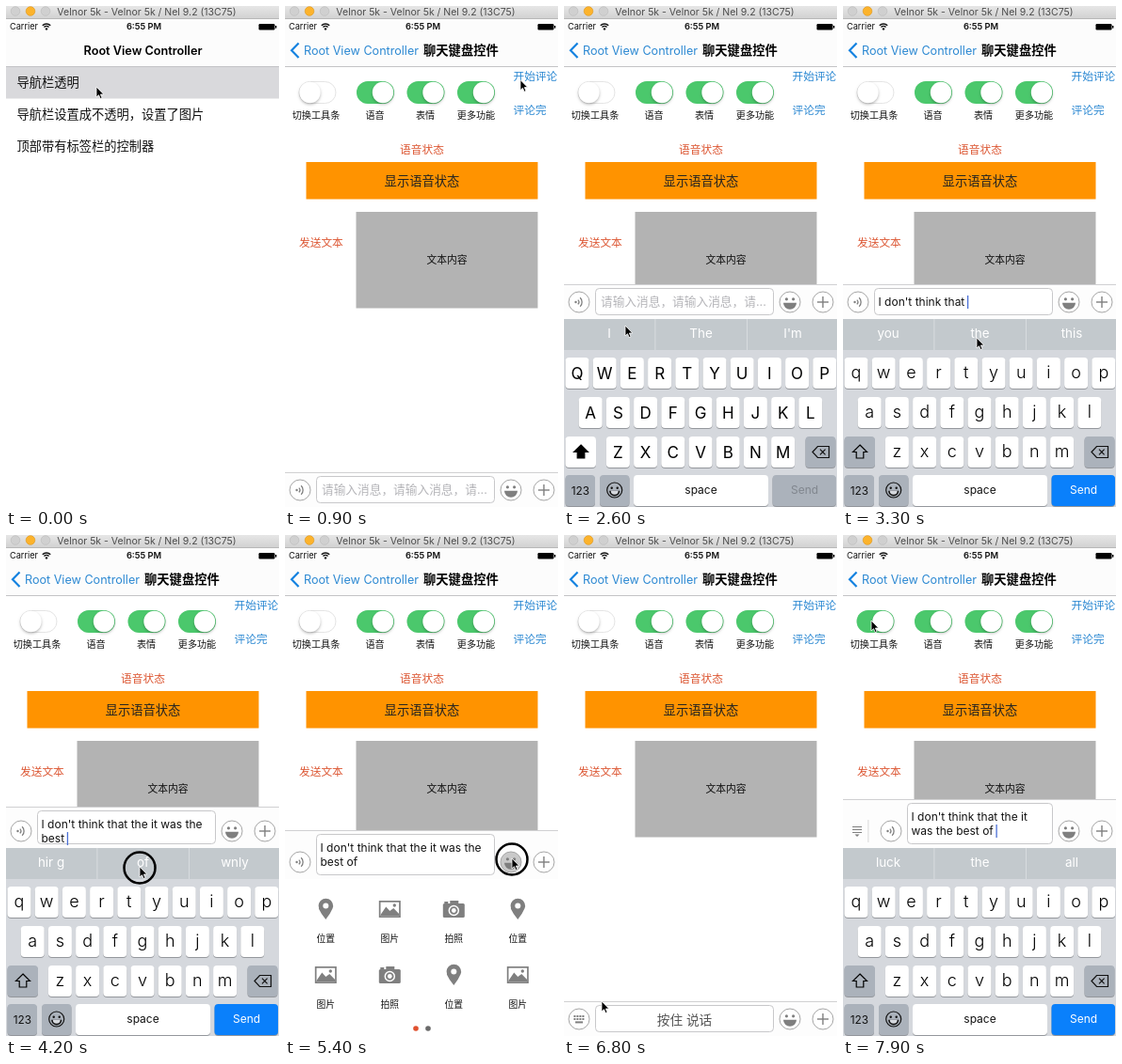
Animation of 290x533 px, one loop 8 s. Source, as an HTML page with a canvas:

```html
<!DOCTYPE html>
<html lang="zh-CN">
<head>
<meta charset="utf-8">
<title>Chat keyboard demo</title>
<style>
html, body { margin: 0; width: 100%; height: 100%; overflow: hidden; background: #fff; }
canvas { display: block; width: 290px; height: 533px; }
</style>
</head>
<body>
<canvas id="stage"></canvas>
<script>
const W = 290, H = 533, LOOP = 8000;
const FONT = 'Inter, "Noto Sans CJK SC", "Noto Sans CJK", sans-serif';
const BLUE = '#2b88d2', RED = '#dc5632', GREY = '#7f7f7f', RING = '#a6a6a6';
const canvas = document.getElementById('stage');
const ratio = window.devicePixelRatio || 1;
canvas.width = W * ratio;
canvas.height = H * ratio;
const c = canvas.getContext('2d');

// --- timing helpers ---
const smooth = x => { x = Math.min(1, Math.max(0, x)); return x * x * (3 - 2 * x); };
const ramp = (t, start, dur) => smooth((t - start) / dur);
const track = (t, steps) => steps.reduce((sum, [start, dur, by]) => sum + by * ramp(t, start, dur), 0);

const KEYS_UP = [[1080, 300, 200], [1577, 300, -200], [2230, 290, 200], [4780, 250, -200], [7060, 280, 200]];
const BAR_UP = [[1080, 300, 200], [1564, 300, -200], [2230, 290, 200], [4780, 250, -33], [6260, 280, -167], [7060, 280, 200]];
const PANEL_UP = [[4780, 250, 167], [6260, 280, -167]];
const BAR_GROW = [[4120, 170, 15], [6260, 140, -15], [7060, 190, 15]];

const WORDS = "I don't think that the it was the best of".split(' ');
const wordTime = i => 2720 + 175 * i;
const CLICKS = [1080, 1562, 2230, 4780, 5460, 6260, 7060, 7740, ...WORDS.map((w, i) => wordTime(i))];
const SIDES = [['I', "I'm"], ['am', 'have'], ['want', 'know'], ['I', 'it'], ['you', 'this'],
  ['best', 'same'], ['is', 'will'], ['a', 'so'], ['first', 'only'], ['hir g', 'wnly'], ['luck', 'all']];

const PATH = [[0, 96, 86], [500, 96, 86], [980, 262, 78], [1120, 262, 78], [1420, 264, 108], [1780, 264, 108],
  [2120, 90, 514], [2260, 90, 514], [2600, 65, 340], [2730, 65, 342], [2820, 142, 353], [4310, 142, 353],
  [4680, 274, 316], [4820, 274, 316], [5250, 241, 344], [5520, 241, 344], [6120, 17, 347], [6320, 17, 347],
  [6800, 40, 496], [6960, 17, 514], [7120, 17, 514], [7620, 30, 91], [8000, 30, 91]];

// --- drawing helpers ---
function text(s, x, y, size, color, align = 'left', weight = 400) {
  c.font = `${weight} ${size}px ${FONT}`;
  c.fillStyle = color;
  c.textAlign = align;
  c.textBaseline = 'alphabetic';
  c.fillText(s, x, y + size * 0.365);
}
const mid = (s, x, y, size, color, weight) => text(s, x, y, size, color, 'center', weight);

function rect(x, y, w, h, color) { c.fillStyle = color; c.fillRect(x, y, w, h); }

function round(x, y, w, h, r, fill, stroke) {
  c.beginPath();
  c.roundRect(x, y, w, h, r);
  if (fill) { c.fillStyle = fill; c.fill(); }
  if (stroke) { c.strokeStyle = stroke; c.lineWidth = 1; c.stroke(); }
}

function disc(x, y, r, fill, stroke, width = 1) {
  c.beginPath();
  c.arc(x, y, r, 0, Math.PI * 2);
  if (fill) { c.fillStyle = fill; c.fill(); }
  if (stroke) { c.strokeStyle = stroke; c.lineWidth = width; c.stroke(); }
}

function poly(points, fill, stroke, width = 1, close = true) {
  c.beginPath();
  points.forEach(([x, y]) => c.lineTo(x, y));
  if (close) c.closePath();
  if (fill) { c.fillStyle = fill; c.fill(); }
  if (stroke) { c.strokeStyle = stroke; c.lineWidth = width; c.stroke(); }
}

function arc(x, y, r, from, to, color, width) {
  c.beginPath();
  c.arc(x, y, r, from, to);
  c.strokeStyle = color;
  c.lineWidth = width;
  c.stroke();
}

function grin(r, color) {
  c.beginPath();
  c.arc(0, 0.8, r, 0, Math.PI);
  c.closePath();
  c.fillStyle = color;
  c.fill();
}

function at(x, y, draw) {
  c.save();
  c.translate(x, y);
  draw();
  c.restore();
}

// --- window chrome ---
function chrome() {
  const g = c.createLinearGradient(0, 0, 0, 13);
  g.addColorStop(0, '#e6e6e6');
  g.addColorStop(1, '#d2d2d2');
  rect(0, 0, W, 13, g);
  rect(0, 13, W, 1, '#b8b8b8');
  disc(10, 5.5, 4.8, '#d0d0d0', '#bdbdbd', 0.7);
  disc(26, 5.5, 4.8, '#fcb32c', '#e09b25', 0.7);
  disc(42, 5.5, 4.8, '#d0d0d0', '#bdbdbd', 0.7);
  mid('Velnor 5k - Velnor 5k / Nel 9.2 (13C75)', 149.5, 6, 10.5, '#4c4c4c');
}

function statusBar() {
  text('Carrier', 4, 22, 9.2, '#111');
  const a = -Math.PI * 0.75, b = -Math.PI * 0.25;
  arc(43, 25, 6, a, b, '#111', 1.4);
  arc(43, 25, 3.6, a, b, '#111', 1.4);
  disc(43, 24.4, 1.2, '#111');
  mid('6:55 PM', 146.5, 22, 9.3, '#111', 600);
  round(268.5, 19, 17, 6.5, 1.2, '#000');
  rect(286, 21, 1.4, 2.6, '#000');
}

function navBar(q) {
  rect(0, 14, W, 50, '#fcfcfc');
  rect(0, 64, W, 0.8, '#b5b5b8');
  statusBar();
  c.globalAlpha = 1 - q;
  mid('Root View Controller', 145.5 - 65 * q, 47, 12.7, '#000', 600);
  c.globalAlpha = q;
  poly([[14.5, 39.5], [7, 47.3], [14.5, 55]], null, '#1482e0', 2.2, false);
  text('Root View Controller', 20 + 65 * (1 - q), 47, 12.6, BLUE);
  text('聊天键盘控件', 147 + 120 * (1 - q), 47, 13.3, '#000', 'left', 600);
  c.globalAlpha = 1;
}

// --- screens ---
function rootList() {
  rect(0, 64, W, H - 64, '#fff');
  rect(0, 65, W, 33.5, '#d9d9dc');
  ['导航栏透明', '导航栏设置成不透明，设置了图片', '顶部带有标签栏的控制器']
    .forEach((s, i) => text(s, 11.5, 81 + 34.3 * i, 13.25, '#111'));
}

function toggle(x, on) {
  round(x, 80, 40, 24, 12, '#fff');
  round(x + 0.5, 80.5, 39, 23, 11.5, null, '#e4e4e4');
  c.globalAlpha = on;
  round(x, 80, 40, 24, 12, '#4bc86c');
  c.globalAlpha = 1;
  c.save();
  c.shadowColor = 'rgba(0,0,0,.28)';
  c.shadowBlur = 3 * ratio;
  c.shadowOffsetY = 1.5 * ratio;
  disc(x + 12 + 16 * on, 92, 11.2, '#fff');
  c.restore();
}

function detail(t) {
  rect(0, 64, W, H - 64, '#fff');
  [[14.5, '切换工具条', 33], [76, '语音', 95.5], [129.5, '表情', 149], [183, '更多功能', 203]]
    .forEach(([x, label, lx], i) => {
      toggle(x, i ? 1 : ramp(t, 7730, 120));
      mid(label, lx, 116.5, 10.1, '#111');
    });
  text('开始评论', 242.5, 75, 11.7, BLUE);
  c.globalAlpha = t > 1450 ? 0.25 + 0.75 * ramp(t, 1600, 250) : 1;
  text('评论完', 242.5, 111, 11.7, BLUE);
  c.globalAlpha = 1;
  mid('语音状态', 145.5, 153, 11.7, RED);
  rect(22.5, 166, 246, 39.5, '#ff9300');
  mid('显示语音状态', 145.5, 186, 13.3, '#222');
  rect(75.5, 219, 193, 102.5, '#b3b3b3');
  mid('文本内容', 172, 270.5, 10.8, '#111');
  text('发送文本', 15, 252, 11.7, RED);
}

// --- input bar ---
function voiceIcon() {
  disc(0, 0, 11, '#fff', RING);
  disc(-3.5, 0, 1.2, GREY);
  [3.3, 6.6].forEach(r => arc(-3.5, 0, r, -0.8, 0.8, GREY, 1.3));
}

function keysIcon() {
  disc(0, 0, 11, '#fff', RING);
  for (let r = 0; r < 2; r++)
    for (let i = 0; i < 4; i++) rect(-5.6 + i * 3, -4 + r * 3, 2, 2, GREY);
  rect(-4, 2.4, 8, 2, GREY);
}

function smileIcon(pressed) {
  disc(0, 0, 11, pressed ? '#c9c9c9' : '#fff', RING);
  disc(-3.6, -3.2, 1.6, GREY);
  disc(3.6, -3.2, 1.6, GREY);
  grin(7, GREY);
}

function plusIcon() {
  disc(0, 0, 11, '#fff', RING);
  rect(-6, -0.7, 12, 1.4, GREY);
  rect(-0.7, -6, 1.4, 12, GREY);
}

function listIcon() {
  rect(11.5, -12, 0.8, 24, '#d0d0d0');
  [-5, -2, 1].forEach(y => rect(-5, y, 10, 1, GREY));
  poly([[-2.5, 3.5], [2.5, 3.5], [0, 6]], GREY);
}

function wrap(words, width) {
  c.font = `400 12px ${FONT}`;
  const lines = [''];
  words.forEach(w => {
    const line = lines[lines.length - 1];
    const next = line ? line + ' ' + w : w;
    if (line && c.measureText(next).width > width) lines.push(w);
    else lines[lines.length - 1] = next;
  });
  return lines;
}

function inputBar(t, words) {
  const base = H - track(t, BAR_UP);
  const top = base - 37 - track(t, BAR_GROW);
  const shift = 35 * ramp(t, 7740, 130);
  const voice = t >= 6260 && t < 7060;
  const left = 33.5 + shift, y = base - 18;
  rect(0, top, W, base - top, '#fdfdfd');
  rect(0, top, W, 0.8, '#c6c6c8');
  if (shift > 0) at(15 - 35 + shift, y, listIcon);
  at(16 + shift, y, voice ? keysIcon : voiceIcon);
  at(240, y, () => smileIcon(t > 5340 && t < 5500));
  at(275, y, plusIcon);
  round(left, top + 4.5, 222.5 - left, base - top - 9, 4, '#fff', '#c8c8ca');
  if (voice) return mid('按住 说话', 128, base - 17.5, 13.7, '#555');
  if (!words.length) return text('请输入消息，请输入消息，请...', 39, base - 19, 12.7, '#b4b4b8');
  const lines = wrap(words, 217 - left - 4);
  lines.forEach((s, i) => text(s, left + 4, top + 18.5 + 15 * i, 12, '#111'));
  if (t < 4780 || t > 7060) {
    const last = lines.length - 1;
    const end = left + 4 + c.measureText(lines[last] + ' ').width;
    rect(end - 0.7, top + 12 + 15 * last, 1.3, 14, '#4a6fd6');
  }
}

// --- keyboard ---
function key(x, y, w, fill) {
  round(x, y + 1, w, 33, 4, '#94979c');
  round(x, y, w, 33, 4, fill);
}

function keyboard(t, count) {
  const top = H - track(t, KEYS_UP);
  if (top >= H) return;
  const caps = count === 0;
  at(0, top, () => {
    rect(0, 0, W, 200, '#d5d8dd');
    rect(0, 0, W, 33, '#c3c9cd');
    rect(96.5, 0, 0.8, 33, '#dde1e4');
    rect(194, 0, 0.8, 33, '#dde1e4');
    const [a, b] = SIDES[count];
    const next = count === 0 ? 'The' : WORDS[count] || 'the';
    [a, next, b].forEach((s, i) => mid(s, 48 + 97.5 * i, 15.5, 13.4, '#fff'));

    ['qwertyuiop', 'asdfghjkl', 'zxcvbnm'].forEach((row, r) => {
      [...row].forEach((ch, i) => {
        const x = [14, 28.2, 57.4][r] + 29.2 * i, y = 41 + 42 * r;
        key(x - 12.5, y, 25, '#fff');
        if (caps) mid(ch.toUpperCase(), x, y + 16.5, 17, '#000');
        else mid(ch, x, y + 15.5, 18, '#000', 300);
      });
    });

    const dark = '#abb2bb';
    key(1.5, 125, 32.5, caps ? '#fff' : dark);
    at(18, 141.5, () => poly([[0, -7.5], [7.5, 0], [3.8, 0], [3.8, 6.5], [-3.8, 6.5], [-3.8, 0], [-7.5, 0]],
      caps ? '#000' : null, '#000', 1.2));
    key(256.5, 125, 32, dark);
    at(273, 141.5, () => {
      poly([[-9, 0], [-3.5, -6], [8.5, -6], [8.5, 6], [-3.5, 6]], null, '#111', 1.2);
      poly([[-1, -2.8], [4.6, 2.8]], null, '#111', 1.2, false);
      poly([[4.6, -2.8], [-1, 2.8]], null, '#111', 1.2, false);
    });

    key(1.5, 166, 31.5, dark);
    mid('123', 17.3, 182.5, 11.8, '#111');
    key(38, 166, 31.5, dark);
    at(53.7, 182, () => {
      disc(0, 0, 8, null, '#111', 1.2);
      disc(-3, -2.3, 1.2, '#111');
      disc(3, -2.3, 1.2, '#111');
      grin(5.6, '#111');
      grin(4, '#d5d8dd');
    });
    key(74, 166, 143, '#fff');
    mid('space', 145.5, 182, 12, '#111');
    key(221.5, 166, 67.5, caps ? dark : '#0a80fb');
    mid('Send', 255.5, 182, 12, caps ? '#80868e' : '#fff');
  });
}

// --- function panel ---
const ITEMS = {
  '位置'() {
    c.beginPath();
    c.arc(0, -3.5, 7.8, Math.PI * 0.88, Math.PI * 0.12);
    c.quadraticCurveTo(5, 5, 0, 11);
    c.quadraticCurveTo(-5, 5, -7.5, -0.6);
    c.fillStyle = GREY;
    c.fill();
    disc(0, -3.5, 3, '#fff');
  },
  '图片'() {
    rect(-11.5, -9, 23, 18, GREY);
    rect(-9.8, -7.3, 19.6, 14.6, '#fff');
    poly([[-9.8, 6], [-4, -2.5], [0, 2], [4, -1], [9.8, 5], [9.8, 7.3], [-9.8, 7.3]], GREY);
    disc(5, -4, 1.7, GREY);
  },
  '拍照'() {
    round(-11.5, -6, 23, 15, 1.5, GREY);
    rect(-4, -9, 9, 4, GREY);
    rect(-10, -8, 4, 2, GREY);
    disc(0, 1.5, 5, null, '#fff', 1.5);
    disc(0, 1.5, 2.4, '#fff');
  }
};

function panel(t) {
  const top = H - track(t, PANEL_UP);
  if (top >= H) return;
  const names = Object.keys(ITEMS);
  at(0, top, () => {
    rect(0, 0, W, 167, '#fff');
    for (let i = 0; i < 8; i++) {
      const name = names[i % 3], x = 43.3 + 68 * (i % 4), y = 32 + 70 * (i >> 2);
      at(x, y, ITEMS[name]);
      mid(name, x, y + 31, 9.8, '#111');
    }
    disc(139, 159, 2.8, '#e0512f');
    disc(152, 159, 2.8, '#6a6a6a');
  });
}

// --- pointer ---
function pointer(t) {
  let i = 0;
  while (i < PATH.length - 2 && PATH[i + 1][0] <= t) i++;
  const [t0, x0, y0] = PATH[i], [t1, x1, y1] = PATH[i + 1];
  const k = ramp(t, t0, t1 - t0);
  at(x0 + (x1 - x0) * k, y0 + (y1 - y0) * k, () => {
    if (CLICKS.some(end => t >= end - 100 && t < end)) disc(0, 1, 16.5, null, '#000', 2.5);
    poly([[0, 0], [0, 11], [2.5, 8.7], [4.2, 12.6], [6, 11.8], [4.4, 8], [7.8, 8]], '#000', '#fff', 0.8);
  });
}

function draw(t) {
  c.setTransform(ratio, 0, 0, ratio, 0, 0);
  rect(0, 0, W, H, '#fff');
  const q = ramp(t, 130, 420);
  const count = WORDS.filter((w, i) => t >= wordTime(i)).length;
  if (q < 1) at(-87 * q, 0, rootList);
  if (q > 0) at(W * (1 - q), 0, () => {
    detail(t);
    inputBar(t, WORDS.slice(0, count));
    panel(t);
    keyboard(t, count);
  });
  navBar(q);
  chrome();
  pointer(t);
}

const begin = performance.now();
function tick() {
  draw((performance.now() - begin) % LOOP);
  requestAnimationFrame(tick);
}
tick();
</script>
</body>
</html>
```
